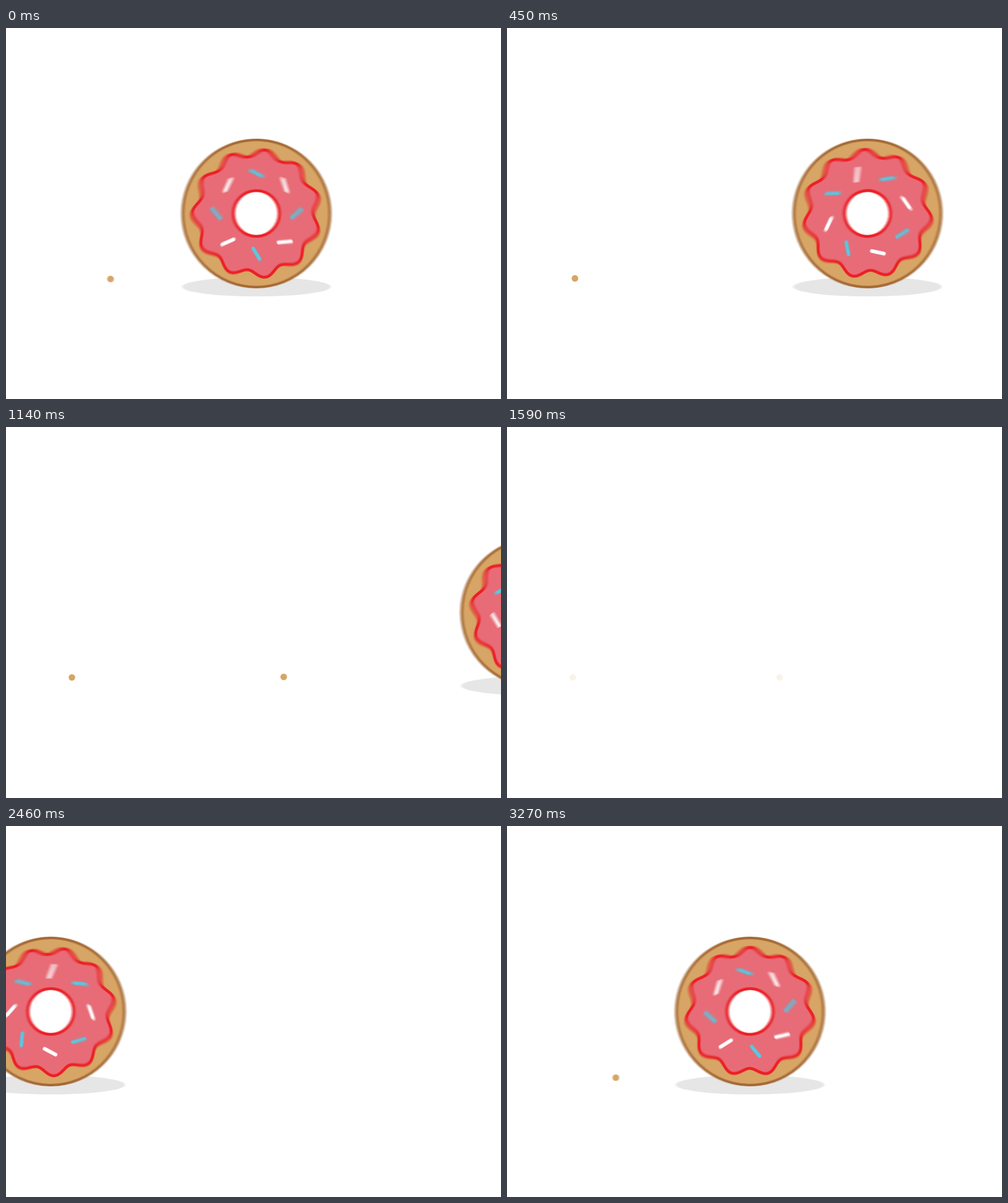
Write an HTML page with a canvas that moves like this. It is 800 px wide and 600 px high and loops after 3300 ms.

```html
<!DOCTYPE html>
<html lang="en">
<head>
<meta charset="utf-8">
<title>Rolling donut</title>
<style>
  html, body { margin: 0; height: 100%; overflow: hidden; background: #fff; }
  canvas { display: block; }
</style>
</head>
<body>
<canvas id="stage" width="800" height="600"></canvas>
<script>
const LOOP = 3300, STEP = 30, SHUTTER = 15, SAMPLES = 12;
const DOUGH = '#d7a565', CRUST = '#a66a35', ICING = '#e86c77', RED = '#ed1f26', BLUE = '#60c5de';
// Tilt in degrees of the sprinkles, spaced 45 degrees apart, blue and white in turn
const TILTS = [-41, -5, 59, -24, 50, -65, 28, 72];
const CRUMBS = [{ x: 106.5, delay: 0 }, { x: 440.5, delay: 774 }];
const RAD = Math.PI / 180;

const out = document.getElementById('stage').getContext('2d');
const layer = document.createElement('canvas');
layer.width = 800;
layer.height = 600;
const c = layer.getContext('2d');

const icing = new Path2D();
for (let a = 0; a < 360; a++) {
  const r = 98 - 6 * Math.cos(11 * a * RAD);
  icing.lineTo(r * Math.cos(a * RAD), r * Math.sin(a * RAD));
}
icing.closePath();

function paint(path, fill, stroke, width) {
  c.fillStyle = fill;
  c.fill(path);
  if (!stroke) return;
  c.strokeStyle = stroke;
  c.lineWidth = width;
  c.stroke(path);
}

function oval(x, y, rx, ry = rx) {
  const path = new Path2D();
  path.ellipse(x, y, rx, ry, 0, 0, 2 * Math.PI);
  return path;
}

function drawCrumb({ x, delay }, time) {
  const t = time - delay;
  if (t < -270) return;
  const d = 62.5 * Math.max(0, 1 - t / 610) ** 2.2;
  const y = 405 + d / 35 - 8 * Math.sin(Math.PI * d / 70) ** 2;
  c.globalAlpha = Math.min(1, Math.max(0.1, (1611 - time) / 201));
  paint(oval(x + d, y, 5.3), DOUGH);
  c.globalAlpha = 1;
}

function drawDonut(x, angle) {
  c.save();
  c.translate(x, 300);
  c.rotate(angle * RAD);
  paint(oval(0, 0, 119), DOUGH, CRUST, 4);
  paint(icing, ICING, RED, 4.6);
  paint(oval(0, 0, 37), '#fff', RED, 4.6);
  c.lineCap = 'round';
  c.lineWidth = 6;
  TILTS.forEach((tilt, i) => {
    const a = i * 45 * RAD;
    const dx = 10 * Math.cos(tilt * RAD), dy = 10 * Math.sin(tilt * RAD);
    const px = 65 * Math.cos(a), py = 65 * Math.sin(a);
    c.strokeStyle = i % 2 ? '#fff' : BLUE;
    c.beginPath();
    c.moveTo(px - dx, py - dy);
    c.lineTo(px + dx, py + dy);
    c.stroke();
  });
  c.restore();
}

function drawScene(time) {
  const x = 404.6 + 0.3955 * time;
  c.fillStyle = '#fff';
  c.fillRect(0, 0, 800, 600);
  paint(oval(x, 418.5, 119.5, 15.5), '#e6e6e6');
  CRUMBS.forEach(crumb => drawCrumb(crumb, time));
  drawDonut(x, time * 8 / 30);
}

function render(now) {
  const t = Math.floor(now % LOOP / STEP) * STEP;
  // The stage rests from 1590 to 1980, then the donut rolls in again
  const time = t < 1980 ? Math.min(t, 1590) : t - LOOP;
  // Motion blur: running average over the open shutter
  for (let i = 0; i < SAMPLES; i++) {
    drawScene(time + ((i + 0.5) / SAMPLES - 0.5) * SHUTTER);
    out.globalAlpha = 1 / (i + 1);
    out.drawImage(layer, 0, 0);
  }
}

const start = performance.now();
function tick() {
  render(performance.now() - start);
  requestAnimationFrame(tick);
}
tick();
</script>
</body>
</html>
```
